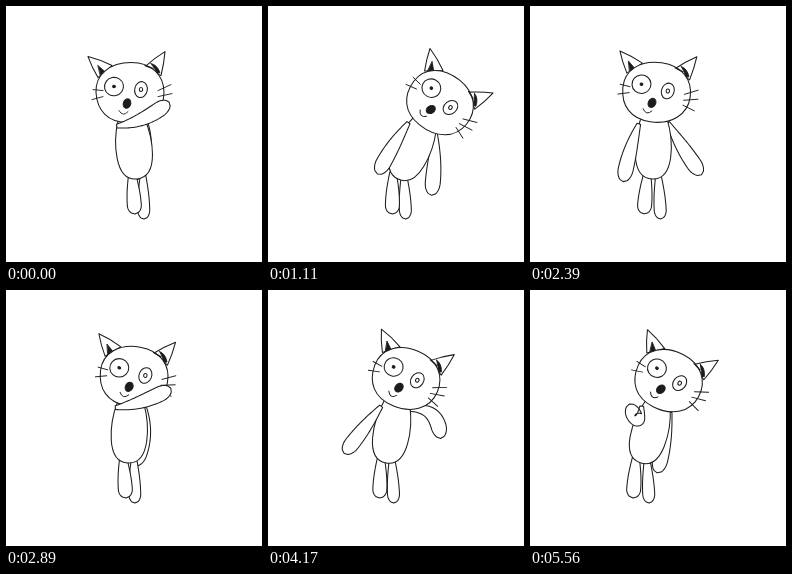
Animation, 256 px wide and 256 px high, one loop 5.62 s. Source, as an HTML page with a canvas:

```html
<!DOCTYPE html>
<html lang="en">
<head>
<meta charset="utf-8">
<title>Dancing cat</title>
<style>
  html, body { margin: 0; width: 100%; height: 100%; overflow: hidden; background: #fff; }
  canvas { display: block; width: 256px; height: 256px; }
</style>
</head>
<body>
<canvas id="stage"></canvas>
<script>
const LOOP = 5620, FPS = 18, INK = '#1c1c1c', PAPER = '#fff';
const canvas = document.getElementById('stage');
const ctx = canvas.getContext('2d');
const ratio = window.devicePixelRatio || 1;
canvas.width = canvas.height = 256 * ratio;

// step, head x, head tilt, hip x, left arm (upper, lower), right arm (upper, lower), left leg
const poses = [
  [0,   124,   0, 131,  97, 130,   8, -28,   4],
  [11,  163,  32, 132, -50, -62,  42,  56,   2],
  [16,  177,  42, 132, -48, -50,  12,  20,   0],
  [20,  172,  39, 130, -35, -28,  -1,  -6,  -1],
  [27,  104, -14, 126, -30, -42,  50,  62, -10],
  [34,  111,  -6, 124,   1,   2,  58,  40, -16],
  [40,  110,  -6, 123, -35, -42,  40,  52, -10],
  [46,  143,  22, 122,  10,  40,  20,  10,   0],
  [52,  128,  10, 122,  97, 120,   8, -25,   4],
  [60,  152,  26, 121, -35, -30,  30,  25,   0],
  [70,  163,  36, 119, -28, -34,  50,  60,  -1],
  [75,  138,  23, 118, -38, -38,  98,   3,  -2],
  [81,  106, -11, 118, -48, -52,  30,  42, -12],
  [89,  122,  13, 117,   5,  20,  35,  40, -22],
  [96,  148,  32, 113, -10, -70,  10,   5,  -8],
  [100, 138.5, 27, 111, -3, -160, -10, -14, -4]
];

const rad = deg => deg * Math.PI / 180;
const rate = (i, k) => (poses[i + 1][k] - poses[i][k]) / (poses[i + 1][0] - poses[i][0]);

// Flat at turning points, so no pose overshoots.
function slope(i, k) {
  if (i === 0 || i === poses.length - 1) return 0;
  const a = rate(i - 1, k), b = rate(i, k);
  return a * b <= 0 ? 0 : 2 * a * b / (a + b);
}

function poseAt(step) {
  let i = 0;
  while (i < poses.length - 2 && step >= poses[i + 1][0]) i++;
  const span = poses[i + 1][0] - poses[i][0];
  const u = (step - poses[i][0]) / span, v = 1 - u;
  return poses[i].map((from, k) =>
    from * (1 + 2 * u) * v * v + poses[i + 1][k] * u * u * (3 - 2 * u) +
    span * u * v * (slope(i, k) * v - slope(i + 1, k) * u));
}

function ink(path, fill = PAPER, width = 1.05) {
  ctx.lineWidth = width;
  ctx.strokeStyle = INK;
  if (fill) { ctx.fillStyle = fill; ctx.fill(path); }
  ctx.stroke(path);
}

const draw = (d, fill, width) => ink(new Path2D(d), fill, width);

function oval(x, y, rx, ry, tilt = 0, fill = PAPER) {
  const path = new Path2D();
  path.ellipse(x, y, rx, ry, rad(tilt), 0, 7);
  ink(path, fill);
}

const reach = (p, deg, length) =>
  [p[0] + length * Math.sin(rad(deg)), p[1] + length * Math.cos(rad(deg))];

// A soft limb, narrow at its root and rounded at its end.
function limb(root, upper, lower, lengthA, lengthB, girth, thin) {
  const mid = reach(root, upper, lengthA), tip = reach(mid, lower, lengthB);
  const left = [], right = [], bulge = 0.8, count = 40;
  for (let n = 0; n <= count; n++) {
    const s = n / count, r = 1 - s;
    const at = k => r * r * root[k] + 2 * r * s * mid[k] + s * s * tip[k];
    const dir = k => r * (mid[k] - root[k]) + s * (tip[k] - mid[k]);
    const size = Math.hypot(dir(0), dir(1)) || 1;
    const w = girth * (s < bulge
      ? thin + (1 - thin) * Math.sin(s / bulge * Math.PI / 2)
      : Math.sqrt(Math.max(0, 1 - ((s - bulge) / (1 - bulge)) ** 2)));
    const nx = -dir(1) / size * w, ny = dir(0) / size * w;
    left.push([at(0) + nx, at(1) + ny]);
    right.unshift([at(0) - nx, at(1) - ny]);
  }
  const path = new Path2D();
  left.concat(right).forEach(p => path.lineTo(p[0], p[1]));
  path.closePath();
  ink(path);
}

function head() {
  draw('M-32-15Q-38-25-42-36Q-30-33-18-27Z');
  draw('M-32-27L-24-20L-29-15Z', INK, 0.8);
  draw('M15-26Q25-35 35-41Q34-29 31-17Z');
  draw('M21-29Q27-28 30-20L27-19Q25-24 21-29Z', INK, 0.8);
  draw('M-34 0C-35-18-20-30 1-30C22-30 34-17 34 0C34 18 19 30-2 30C-22 30-33 18-34 0Z');
  draw('M15-27L23-24', null, 1.3);
  oval(-16, -6, 9.5, 9.2, -12);
  oval(-16, -6, 1.4, 1.2, 0, INK);
  oval(11, -3, 6.3, 8, 12);
  oval(11, -3, 1.7, 2);
  oval(-3, 11, 3.7, 4.8, 20, INK);
  draw('M-11 18Q-7 25-2 19', null, 0.9);
  draw('M-37-3L-27-2M-38 7L-27 4M28-2L41-8M28 4L42 1M28 9L40 13', null, 0.9);
}

function cat(step) {
  const [, hx, tilt, hipX, armL1, armL2, armR1, armR2, legL] = poseAt(step);
  const hipY = 173, hy = 86.3 + 0.006 * (hx - hipX) ** 2;
  const a = rad(tilt);
  const neck = [hx + Math.cos(a) - 25 * Math.sin(a), hy + Math.sin(a) + 25 * Math.cos(a)];
  const length = Math.hypot(hipX - neck[0], hipY - neck[1]);
  const dx = (hipX - neck[0]) / length, dy = (hipY - neck[1]) / length;
  const onBody = (x, y) => [neck[0] + x * dy + y * dx, neck[1] - x * dx + y * dy];
  const legR = 2 - legL * 0.2;

  limb(onBody(14, 5), armR1, armR2, 29, 33, 7.5, 0.25);
  limb([hipX + 6, 169], legR, legR, 21, 23, 6, 0.45);
  limb([hipX - 5, 166], legL, legL, 20, 22, 7, 0.45);

  ctx.save();
  ctx.transform(dy, -dx, dx, dy, neck[0], neck[1]);
  ctx.scale(1, length / 62);
  draw('M-13 1C-20 22-23 62 0 62C23 62 20 22 13 1');
  ctx.restore();

  ctx.save();
  ctx.translate(hx, hy);
  ctx.rotate(a);
  head();
  ctx.restore();

  limb(onBody(-15, 7), armL1, armL2, 28, 32, 7.5, 0.25);
}

function frame(now) {
  const step = Math.min(100, Math.floor((now % LOOP + 5) * FPS / 1000));
  ctx.setTransform(ratio, 0, 0, ratio, 0, 0);
  ctx.fillStyle = PAPER;
  ctx.fillRect(0, 0, 256, 256);
  ctx.lineCap = ctx.lineJoin = 'round';
  cat(step);
}

const start = performance.now();
function tick() {
  frame(performance.now() - start);
  requestAnimationFrame(tick);
}
tick();
</script>
</body>
</html>
```
